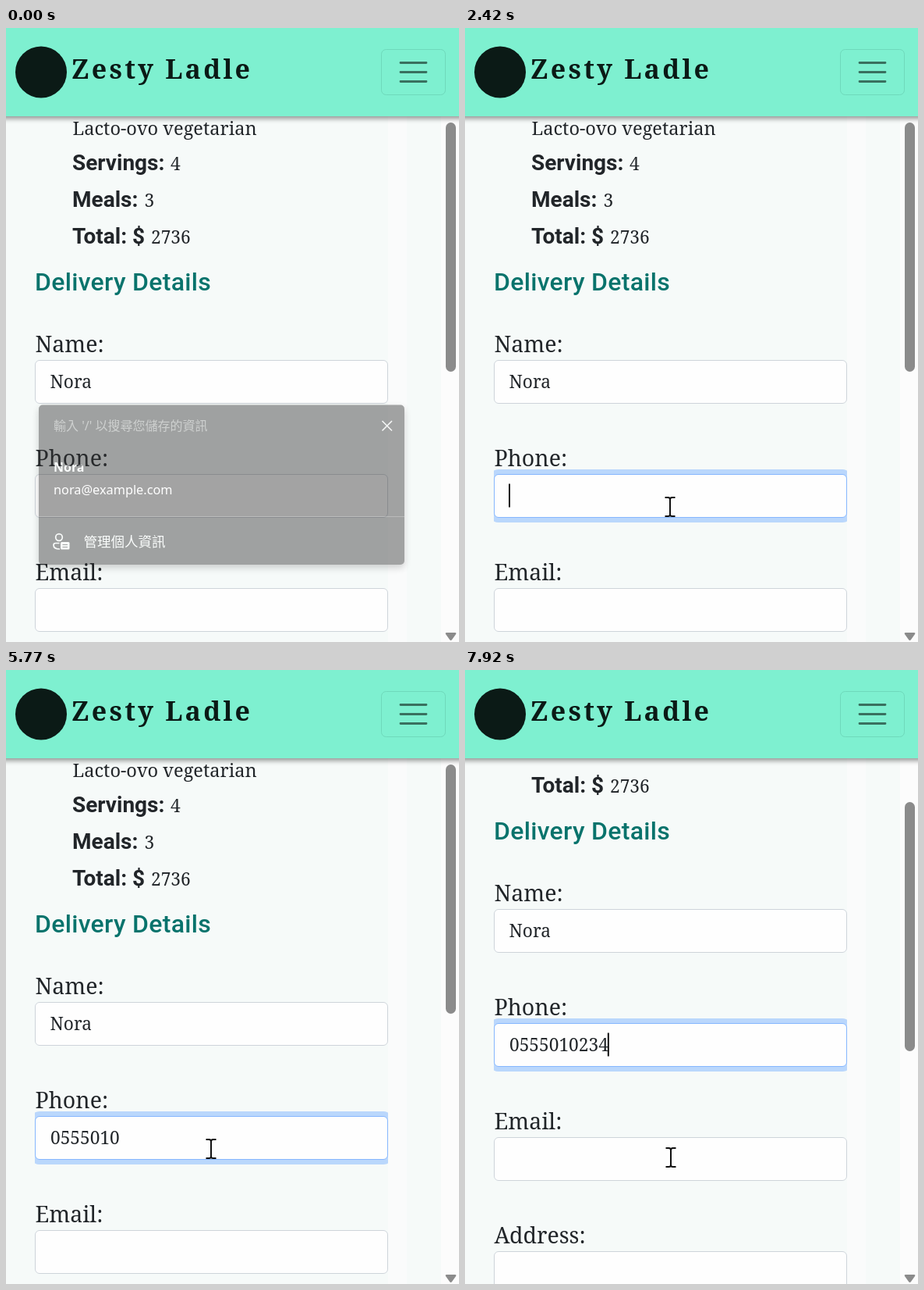
An HTML page for the animation above (7990 ms loop, 581x786 px).

```html
<!DOCTYPE html>
<html lang="en">
<head>
<meta charset="utf-8">
<title>Delivery form</title>
<style>
  html, body { margin: 0; width: 100%; height: 100%; overflow: hidden; background: #f6faf9; }
  svg { display: block; width: 581px; height: 786px; }

  text { white-space: pre; }
  .serif { font-family: "Noto Serif", serif; fill: #212529; }
  .brand { font-size: 34px; font-weight: 700; letter-spacing: 3.2px; fill: #0b1a16; }
  .line { font-size: 23.6px; }
  .value { font-size: 22.7px; }
  .label { font-size: 28.5px; }
  .roboto { font-family: Roboto, sans-serif; fill: #212529; }
  .key { font-size: 28px; font-weight: 600; }
  .title { font-size: 32px; font-weight: 500; letter-spacing: .3px; fill: #08736c; }
  .popup text { font-family: "Noto Sans", "Noto Sans CJK TC", "Noto Sans CJK", sans-serif; fill: #fff; }

  .popup, .content, .thumb, .ring, .edge, .spot, .cursor, .arrow, .beam {
    animation: 7990ms linear infinite;
  }
  .popup { animation-name: popup; animation-timing-function: step-end; transform-origin: 276.5px 585px; }
  .content { animation-name: scroll; }
  .thumb { animation-name: thumb; }
  .ring { animation-name: ring; }
  .edge { animation-name: edge; }
  .spot { animation-name: spot; animation-timing-function: step-end; }
  .cursor { animation-name: cursor; }
  .arrow { animation-name: arrow; animation-timing-function: step-end; }
  .beam { animation-name: beam; animation-timing-function: step-end; }

  @keyframes popup {
    0% { opacity: .44; transform: scale(1); }
    .876% { opacity: .07; transform: scale(.978); }
    1.752%, 100% { opacity: 0; transform: scale(.978); }
  }
  @keyframes scroll {
    0%, 89.24% { transform: translateY(0); }
    91.93%, 92.7% { transform: translateY(-109px); }
    93.2%, 100% { transform: translateY(-119px); }
  }
  @keyframes thumb {
    0%, 89.24% { transform: translateY(0); }
    91.93%, 92.7% { transform: translateY(44px); }
    93.2%, 100% { transform: translateY(48px); }
  }
  @keyframes ring {
    0%, 17.6% { stroke-width: 0; opacity: 0; }
    18%, 18.75% { stroke-width: 4px; opacity: .45; }
    19.65%, 100% { stroke-width: 12px; opacity: 1; }
  }
  @keyframes edge {
    0%, 17.6% { stroke: #ced4da; }
    18%, 18.75% { stroke: #b3cbea; }
    19.65%, 100% { stroke: #86b7fe; }
  }
  @keyframes spot {
    0% { opacity: 0; }
    16.9% { opacity: .5; }
    18.77%, 100% { opacity: 0; }
  }
  @keyframes cursor {
    0%, 8.76% { transform: translate(500px, 617px); }
    10.51% { transform: translate(430px, 556px); }
    12.27% { transform: translate(345px, 541px); }
    14.02% { transform: translate(276px, 588px); }
    15.02%, 24.16% { transform: translate(264px, 613px); }
    25.03%, 86.48% { transform: translate(263px, 613px); }
    89.24%, 93.87% { transform: translate(284px, 537px); }
    96.37% { transform: translate(269px, 566px); }
    99.1%, 100% { transform: translate(264px, 624px); }
  }
  @keyframes arrow {
    0% { opacity: 0; }
    8.76% { opacity: 1; }
    13.6% { opacity: 0; }
    88% { opacity: 1; }
    98%, 100% { opacity: 0; }
  }
  @keyframes beam {
    0% { opacity: 0; }
    13.6% { opacity: 1; }
    88% { opacity: 0; }
    98%, 100% { opacity: 1; }
  }
</style>
</head>
<body>
<svg viewBox="0 0 581 786">
  <defs>
    <rect id="box" x="37.5" y=".5" width="452" height="55" rx="5.5"/>
    <clipPath id="column"><rect x="37" y="500" width="453" height="200"/></clipPath>
  </defs>

  <rect width="581" height="786" fill="#f6faf9"/>
  <rect x="490" width="24" height="786" fill="#fafbfb"/>
  <rect x="558" width="23" height="786" fill="#fcfcfc"/>

  <g class="content">
    <text class="serif line" x="85.5" y="137">Lacto-ovo vegetarian</text>
    <g class="roboto key">
      <text x="85" y="182">Servings:</text>
      <text x="85" y="229">Meals:</text>
      <text x="85" y="276">Total: $</text>
    </g>
    <g class="serif value">
      <text x="211" y="182">4</text>
      <text x="177.500" y="229">3</text>
      <text x="186" y="276">2736</text>
    </g>
    <text class="roboto title" x="37" y="336">Delivery Details</text>

    <g class="serif label">
      <text x="37.500" y="415">Name:</text>
      <text x="37.500" y="561">Phone:</text>
      <text x="37.500" y="707">Email:</text>
      <text x="37.500" y="853">Address:</text>
    </g>
    <g clip-path="url(#column)">
      <rect class="ring" x="37" y="571" width="453" height="56" rx="6" fill="none" stroke="#bad7fc"/>
    </g>
    <g fill="#fefefe" stroke="#ced4da">
      <use href="#box" y="425"/>
      <use href="#box" y="571" class="edge"/>
      <use href="#box" y="717"/>
      <use href="#box" y="863"/>
    </g>
    <text class="serif value" x="56.500" y="461">Nora</text>
    <text class="serif value" x="57" y="607" id="phone"></text>
    <rect id="caret" x="56" y="583.5" width="2" height="30" fill="#111" visibility="hidden"/>
  </g>

  <rect class="thumb" x="564" y="121" width="13" height="319" rx="6.5" fill="#8b8b8b"/>
  <path d="M565 774h11q2 0 1 2l-5 7q-1.500 2-3 0l-5-7q-1-2 1-2z" fill="#8b8b8b"/>

  <g class="popup">
    <rect x="42" y="482.500" width="469" height="204.500" rx="5" fill="#323232"
          style="filter: drop-shadow(0 4px 5px rgba(0,0,0,.4))"/>
    <text x="61" y="515" font-size="16" style="fill:#9c9c9c">輸入 '/' 以搜尋您儲存的資訊</text>
    <path d="M482.500 503l12.500 12.500M495 503l-12.500 12.500" stroke="#f2f2f2" stroke-width="1.600"/>
    <text x="61" y="568" font-size="16" font-weight="700">Nora</text>
    <text x="61" y="597" font-size="16.300">nora@example.com</text>
    <path d="M42 625.500H511" stroke="#6a6a6a"/>
    <g fill="none" stroke="#fff" stroke-width="1.700">
      <circle cx="68" cy="652" r="4.300"/>
      <path d="M69 667q-8 0-8-5 0-2.500 2.500-2.500h5"/>
    </g>
    <rect x="70" y="658" width="11.500" height="9.500" rx="1.500" fill="#fff"/>
    <path d="M72.500 661.500h6.500M72.500 664.500h6.500" stroke="#323232" stroke-width="1.200"/>
    <text x="99.500" y="664" font-size="17.500">管理個人資訊</text>
  </g>

  <rect x="-10" y="-10" width="601" height="123" fill="#7ef0d0"
        style="filter: drop-shadow(0 3px 3px rgba(0,0,0,.42))"/>
  <circle cx="45" cy="56.500" r="33" fill="#0b1a16"/>
  <text class="serif brand" x="84" y="65" style="fill:#0b1a16">Zesty Ladle</text>
  <rect x="481.500" y="27.500" width="82" height="58" rx="6" fill="none" stroke="#6fd9bb"/>
  <path d="M506 44.500h33M506 56.500h33M506 68.500h33" stroke="#39705f" stroke-width="2.800" stroke-linecap="round"/>

  <g class="cursor">
    <path class="arrow" d="M.5.500V21.500L5.500 17l4 9.500 4-1.700-4-9.300h7z" fill="#fff" stroke="#222" stroke-width="1.200"/>
    <path class="beam" d="M-6.500-12h4q2.500 0 2.500 2.500V9.500q0 2.500-2.500 2.500h-4M6.500-12h-4q-2.500 0-2.500 2.500V9.500q0 2.500 2.500 2.500h4"
          fill="none" stroke="#111" stroke-width="2"/>
  </g>
  <circle class="spot" cx="261" cy="612" r="18" fill="#ff0"/>
</svg>
<script>
  const LOOP = 7990, FOCUS = 1430, NUMBER = "0555010234";
  const keys = [2860, 3220, 3430, 3630, 4780, 5060, 5210, 5990, 6200, 6410];
  const blinks = [[1930, 2420], [4210, 4700], [5770, 5990], [6940, 7470]];
  const phone = document.getElementById("phone");
  const caret = document.getElementById("caret");
  let start;

  function draw(now) {
    start ??= now;
    const t = (now - start) % LOOP;
    const typed = NUMBER.slice(0, keys.filter(k => k <= t).length);
    if (phone.textContent !== typed) phone.textContent = typed;
    const lit = t >= FOCUS && !blinks.some(([off, on]) => t >= off && t < on);
    caret.setAttribute("visibility", lit ? "visible" : "hidden");
    caret.setAttribute("x", 56 + (typed ? phone.getComputedTextLength() : 0));
    requestAnimationFrame(draw);
  }
  requestAnimationFrame(draw);
</script>
</body>
</html>
```
